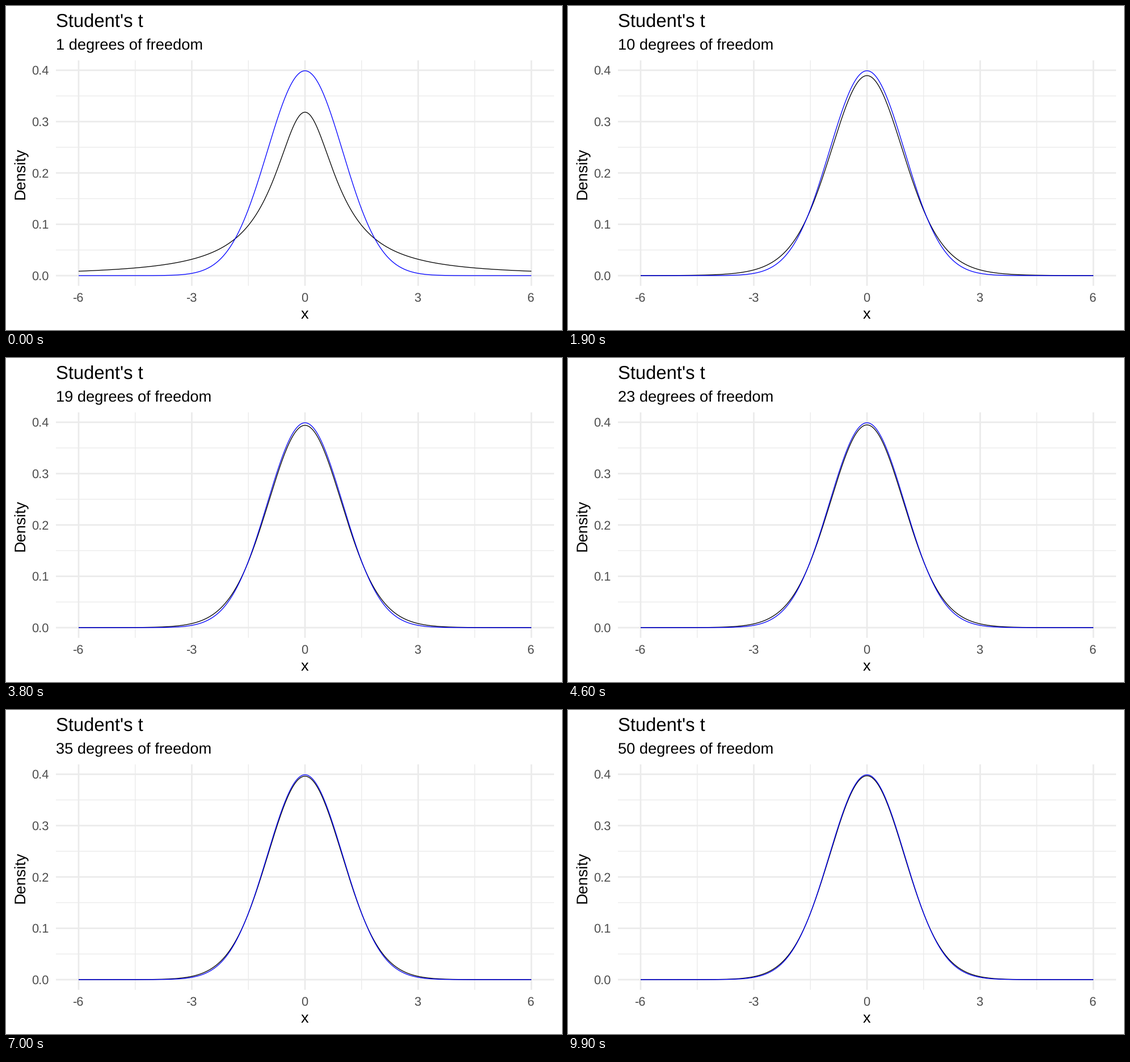
A matplotlib script for the animation above (10 s loop, 980 by 572 pixels).

```python
import math

import matplotlib.pyplot as plt
import numpy as np
from matplotlib.animation import FuncAnimation

plt.rcParams["font.family"] = "Liberation Sans"
plt.rcParams["text.hinting"] = "none"

W, H, DPI = 980, 572, 100
FRAMES, INTERVAL = 100, 100
DF_MAX = 50
LEFT, RIGHT, TOP, BOTTOM = 88.1, 965.9, 96.3, 494.1
BASE = 27.3  # base font size in pixels
PEAK = 1 / math.sqrt(2 * math.pi)


def points(px):
    return px * 72 / DPI


def label(x, baseline, text, size=BASE, color="black", **kw):
    return fig.text(x / W, 1 - baseline / H, text, fontsize=points(size),
                    color=color, va="baseline", **kw)


def student(x, df):
    norm = math.gamma((df + 1) / 2) / (math.sqrt(df * math.pi) * math.gamma(df / 2))
    return norm * (1 + x * x / df) ** (-(df + 1) / 2)


fig = plt.figure(figsize=(W / DPI, H / DPI), dpi=DPI, facecolor="white")
ax = fig.add_axes([LEFT / W, 1 - BOTTOM / H, (RIGHT - LEFT) / W, (BOTTOM - TOP) / H])
ax.set_xlim(-6.6, 6.6)
ax.set_ylim(-0.05 * PEAK, 1.05 * PEAK)
ax.axis("off")


def grid(xs, ys, width):
    style = dict(color="#EBEBEB", lw=points(width), snap=False, zorder=1)
    for v in xs:
        ax.axvline(v, **style)
    for v in ys:
        ax.axhline(v, **style)


x_major = range(-6, 7, 3)
y_major = np.arange(5) / 10
grid(np.arange(-4.5, 5, 3), y_major[:-1] + 0.05, 1.35)
grid(x_major, y_major, 2.7)

for v in x_major:
    label(527 + 66.5 * v - 0.8, 522, str(v), 0.8 * BASE, "#4D4D4D", ha="center")
for v in y_major:
    label(45.3, 483.7 - 906.5 * v, f"{v:.1f}", 0.8 * BASE, "#4D4D4D")

label(88, 38, "Student's t", 1.2 * BASE)
subtitle = label(88, 77, "")
label(526.8, 552.5, "x", ha="center")
label(33.5, 296, "Density", ha="center", rotation=90, rotation_mode="anchor")

x = np.linspace(-6, 6, 601)
curves = [student(x, df) for df in range(1, DF_MAX + 1)]
# Frame at which each whole number of degrees of freedom is reached
keys = np.round(np.arange(DF_MAX) * (FRAMES - 1) / (DF_MAX - 1))

stroke = dict(lw=points(1.3), snap=False, solid_capstyle="butt")
t_line, = ax.plot(x, curves[0], color="black", zorder=2, **stroke)
ax.plot(x, PEAK * np.exp(-x * x / 2), color="blue", zorder=3, **stroke)


def update(i):
    # The first curve holds for two frames, then densities blend linearly
    pos = 0 if i < 2 else np.interp(i, keys, np.arange(DF_MAX))
    k = min(int(pos), DF_MAX - 2)
    mix = pos - k
    t_line.set_ydata((1 - mix) * curves[k] + mix * curves[k + 1])
    df = 1 + i * (DF_MAX - 1) // (FRAMES - 1)
    subtitle.set_text(f"{df} degrees of freedom")
    return t_line, subtitle


anim = FuncAnimation(fig, update, frames=FRAMES, interval=INTERVAL,
                     repeat=True, repeat_delay=0, blit=False)
plt.show()
```
